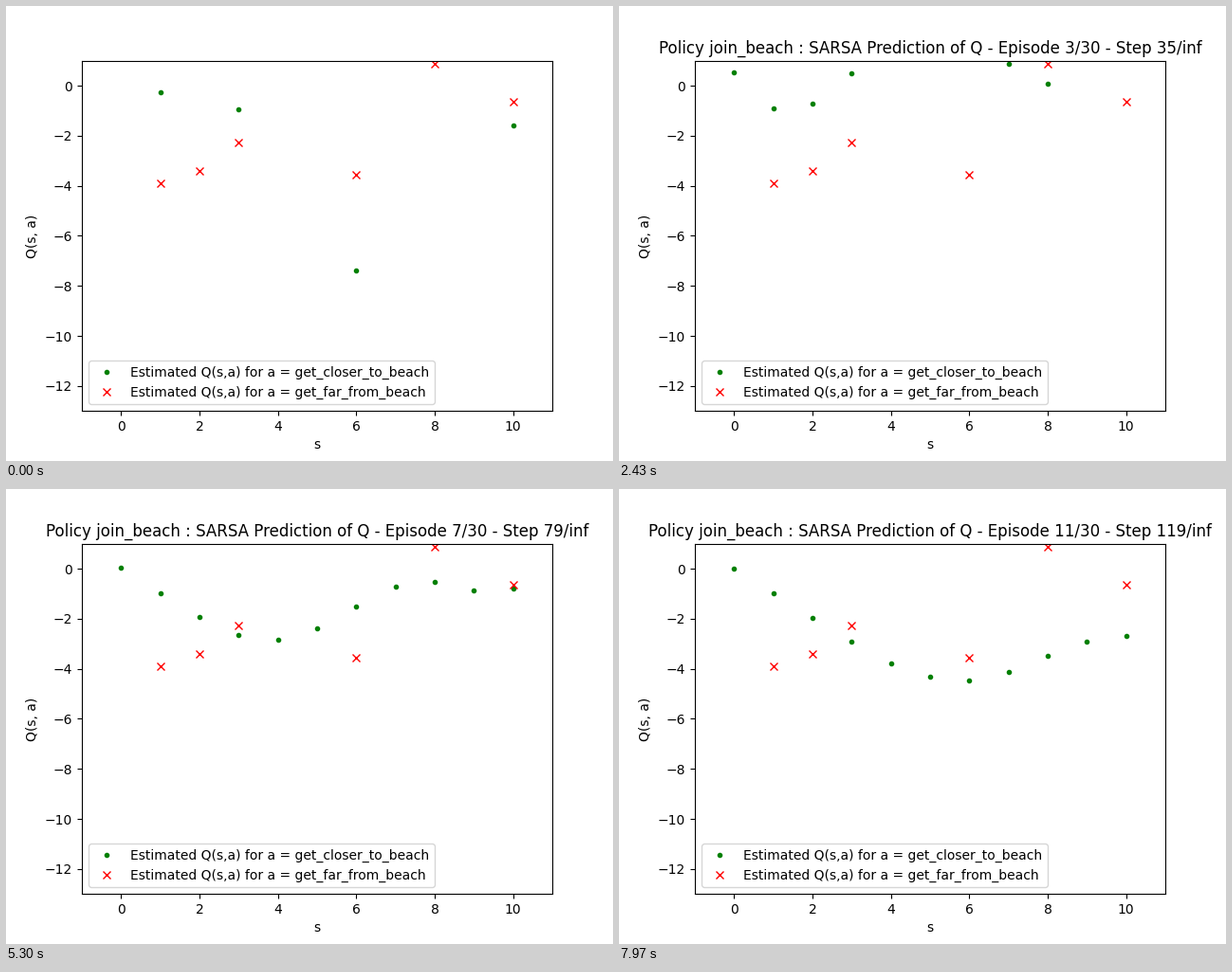
A matplotlib script that plays this animation: 640x480 px, repeating every 8000 ms.

```python
import numpy as np
import matplotlib.pyplot as plt
from matplotlib.animation import FuncAnimation

FRAMES = 240
LOOP_MS = 8000
EPISODES = 30
LAST = 10            # every episode starts here and walks down to state 0
ALPHA, GAMMA, REWARD = 0.5, 0.99, -1

CLOSER = [4.3, -0.27, 5.885, -0.95, 8.98, 5.227, -7.4, 10.2, 7.04, 5.33, -1.59]
FAR = {1: -3.9, 2: -3.41, 3: -2.27, 6: -3.56, 8: 0.87, 10: -0.64}


def q_after(updates):
    """Q values of the walk to the beach after some SARSA updates."""
    q = np.array(CLOSER)
    for n in range(updates):
        s = LAST - n % LAST
        if s == LAST and n:
            q[0] -= ALPHA * q[0]      # terminal state of the episode just ended
        follow = q[s - 1] if s > 1 else 0
        q[s] += ALPHA * (REWARD + GAMMA * follow - q[s])
    return q


fig, ax = plt.subplots(figsize=(6.4, 4.8), dpi=100)
states = np.arange(LAST + 1)
closer, = ax.plot(states, CLOSER, ".", color="green",
                  label="Estimated Q(s,a) for a = get_closer_to_beach")
ax.plot(list(FAR), list(FAR.values()), "x", color="red",
        label="Estimated Q(s,a) for a = get_far_from_beach")
ax.set(xlim=(-1, 11), ylim=(-13, 1), xlabel="s", ylabel="Q(s, a)")
ax.legend(loc="lower left")
title = ax.set_title("")


def draw(k):
    # the title moves on odd frames, the estimate on even ones
    closer.set_ydata(q_after(k // 2))
    step = (k - 1) // 2
    title.set_text("" if k == 0 else
                   "Policy join_beach : SARSA Prediction of Q - "
                   f"Episode {step // LAST}/{EPISODES} - Step {step}/inf")
    return closer, title


anim = FuncAnimation(fig, draw, frames=FRAMES, init_func=lambda: draw(0),
                     interval=LOOP_MS / FRAMES, repeat=True, repeat_delay=0)
plt.show()
```
